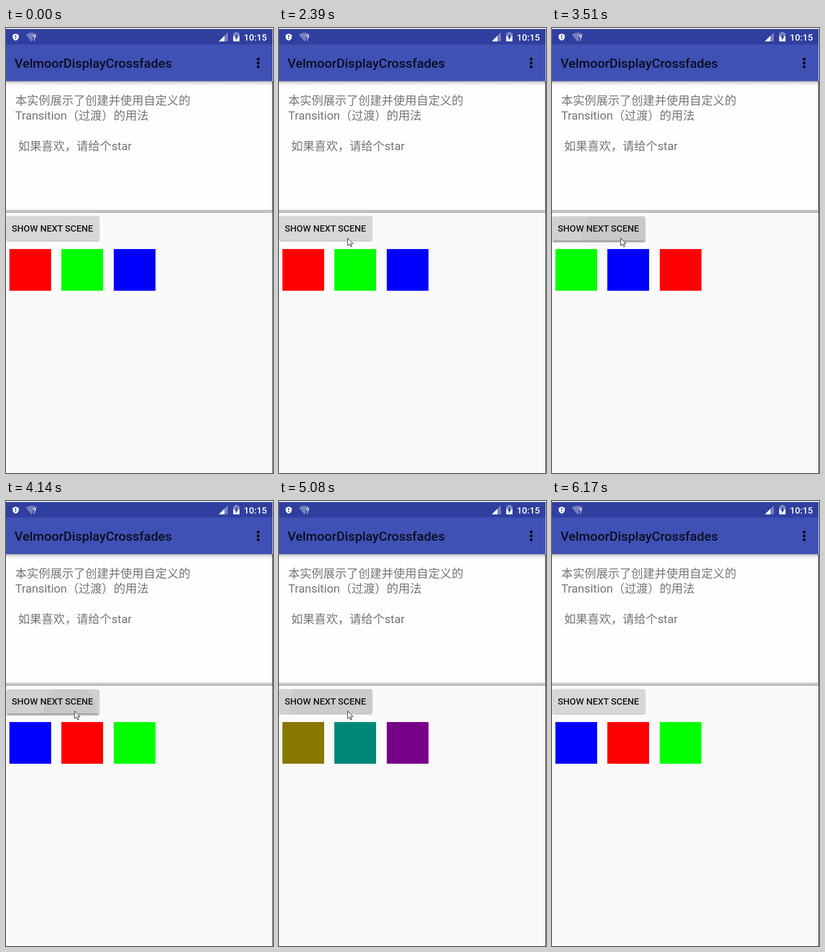
Write an HTML page that moves like this. It is 550x918 px and loops after 8.28 s.

```html
<!DOCTYPE html>
<html lang="zh-CN">
<head>
<meta charset="utf-8">
<title>Scene transitions</title>
<style>
  html, body { margin: 0; width: 100%; height: 100%; overflow: hidden; background: #fafafa; }
  svg { display: block; width: 550px; height: 918px; font-family: Roboto, "Noto Sans CJK SC", sans-serif; }
  .body { font-size: 24.05px; fill: #757575; }
  .medium { font-weight: 500; font-size: 18.7px; }
</style>
</head>
<body>
<svg viewBox="0 0 550 918">
  <defs>
    <linearGradient id="drop" x2="0" y2="1">
      <stop stop-color="#000" stop-opacity=".34"/>
      <stop offset=".4" stop-color="#000" stop-opacity=".1"/>
      <stop offset="1" stop-color="#000" stop-opacity="0"/>
    </linearGradient>
    <filter id="blur" x="-10%" y="-30%" width="120%" height="170%"><feGaussianBlur stdDeviation="1.5"/></filter>
    <clipPath id="face"><rect x="1" y="388.5" width="191" height="50" rx="2.5"/></clipPath>
  </defs>

  <rect width="550" height="918" fill="#fafafa"/>
  <rect y="109" width="549" height="267" fill="#fefefe"/>
  <rect x="547" y="110" width="2" height="267" fill="#d8d8d8"/>
  <rect y="375" width="549" height="5" fill="#c8c8c8"/>
  <rect y="379.5" width="549" height="1.5" fill="#a3a3a3"/>
  <rect y="109" width="549" height="11" fill="url(#drop)"/>
  <rect x="549" y="110" width="1" height="808" fill="#111"/>

  <rect width="550" height="2" fill="#fff"/>
  <rect y="2" width="549" height="32" fill="#303f9f"/>
  <rect y="34" width="549" height="75.5" fill="#3f51b5"/>

  <!-- status icons -->
  <path d="M20 11.5l6.3 2.8v4.2c0 3.5-2.7 6.6-6.3 7.5c-3.6-.9-6.3-4-6.3-7.5v-4.2z" fill="#fff"/>
  <path d="M18.9 14.5h2.2v4.6h-2.2zM18.9 20.5h2.2v2.2h-2.2z" fill="#303f9f"/>
  <path d="M41 13.8Q52.500 5.500 64 13.800L61 17H55V24.500L52.500 28z" fill="#fff" opacity=".34"/>
  <text x="55" y="26" font-size="14" font-weight="700" fill="#fff">?</text>
  <path d="M457 9v18.500h-18.500z" fill="#fff" opacity=".34"/>
  <path d="M450 16v11.500h-11.500z" fill="#fff"/>
  <path d="M468 10.500h3.500v-2.500h6v2.500h3.500v6h-13z" fill="#fff" opacity=".38"/>
  <path d="M468 16.500h13v11h-13z" fill="#fff"/>
  <path d="M475.800 12v5.200h3l-5.300 8.300v-5.700h-3z" fill="#303f9f"/>
  <text class="medium" x="490" y="26" fill="#fff">10:15</text>

  <text x="17.500" y="82" font-size="26.7" font-weight="500" fill="#0b0e1f">VelmoorDisplayCrossfades</text>
  <g fill="#080b18">
    <circle cx="519.500" cy="64" r="2.900"/><circle cx="519.500" cy="72" r="2.900"/><circle cx="519.500" cy="80" r="2.900"/>
  </g>

  <g class="body">
    <text x="19" y="158">本实例展示了创建并使用自定义的</text>
    <text x="19" y="189">Transition（过渡）的用法</text>
    <text x="25" y="252">如果喜欢，请给个star</text>
  </g>

  <rect id="shadow" x="1.500" y="389.500" width="190" height="50" rx="2.500" filter="url(#blur)"/>
  <g clip-path="url(#face)">
    <rect y="388" width="193" height="52" fill="#d6d7d7"/>
    <rect id="wash" y="388" width="193" height="52"/>
    <circle id="ripple" cx="132" cy="433"/>
  </g>
  <text class="medium" x="11.800" y="420" fill="#151616">SHOW NEXT SCENE</text>

  <rect class="tile" x="7" y="456" width="86" height="86"/>
  <rect class="tile" x="114" y="456" width="86" height="86"/>
  <rect class="tile" x="222" y="456" width="86" height="86"/>

  <path id="cursor" d="M.5.5V16l3.600-3.300L6.600 18.500l2.400-1L6.600 11.900h5z" fill="#fff" stroke="#000" stroke-width="1"/>
</svg>
<script>
  const LOOP = 8280, STEP = 78, FADE = 300, HOLD = 210;
  const clicks = [2862, 3540, 4210, 4860, 5574];
  const bursts = [0, 2650, 3510, 4380, 5380];   // screen refreshes restart here
  const colors = [[255, 0, 0], [0, 255, 0], [0, 0, 255]];
  // time, x, y of the pointer
  const path = [
    [0, -99, -99], [1480, 438, 916], [1570, 310, 752], [1645, 191, 604],
    [1870, 178, 560], [1950, 166, 520], [2025, 155, 485], [2100, 146, 456],
    [2180, 141, 440], [2390, 141, 433], [5615, 146, 440], [5700, 151, 451],
    [5775, 260, 640], [5850, 431, 899], [5925, -99, -99]
  ];

  const byId = id => document.getElementById(id);
  const [shadow, wash, ripple, cursor] = ['shadow', 'wash', 'ripple', 'cursor'].map(byId);
  const tiles = document.querySelectorAll('.tile');
  const clamp = v => Math.max(0, Math.min(1, v));
  const ease = v => (1 - Math.cos(Math.PI * clamp(v))) / 2;
  const set = (el, attrs) => { for (const k in attrs) el.setAttribute(k, attrs[k]); };

  function refreshTime(t) {
    const start = bursts.filter(b => b <= t).pop();
    return start + Math.floor((t - start) / STEP) * STEP;
  }

  function drawTiles(t) {
    const shift = clicks.reduce((sum, c) => sum + ease((t - c) / FADE), 0);
    const whole = Math.floor(shift), part = shift - whole;
    tiles.forEach((tile, i) => {
      const from = colors[(i + whole) % 3], to = colors[(i + whole + 1) % 3];
      const mix = from.map((v, k) => Math.round(v + (to[k] - v) * part));
      set(tile, { fill: `rgb(${mix})` });
    });
  }

  function drawButton(t) {
    const click = clicks.filter(c => c - HOLD <= t).pop() ?? Infinity;
    const age = click < Infinity ? t - click + HOLD : 0;
    const after = t - click;
    const lift = clamp(age / 60) * (1 - clamp(after / 100));
    const fade = 1 - clamp((after - 80) / 320);
    set(shadow, { y: 389.5 + 2 * lift, opacity: 0.36 + 0.08 * lift });
    set(wash, { opacity: 0.03 * clamp(age / 90) * fade });
    set(ripple, {
      r: 137 * (1 - Math.exp(-Math.max(0, age - 40) / 190)),
      opacity: 0.04 * clamp((age - 40) / 60) * fade
    });
  }

  function draw() {
    const t = performance.now() % LOOP;
    const shown = refreshTime(t);
    drawTiles(shown);
    drawButton(shown);
    const [, x, y] = path.filter(p => p[0] <= t).pop();
    set(cursor, { transform: `translate(${x} ${y})` });
    requestAnimationFrame(draw);
  }
  draw();
</script>
</body>
</html>
```
